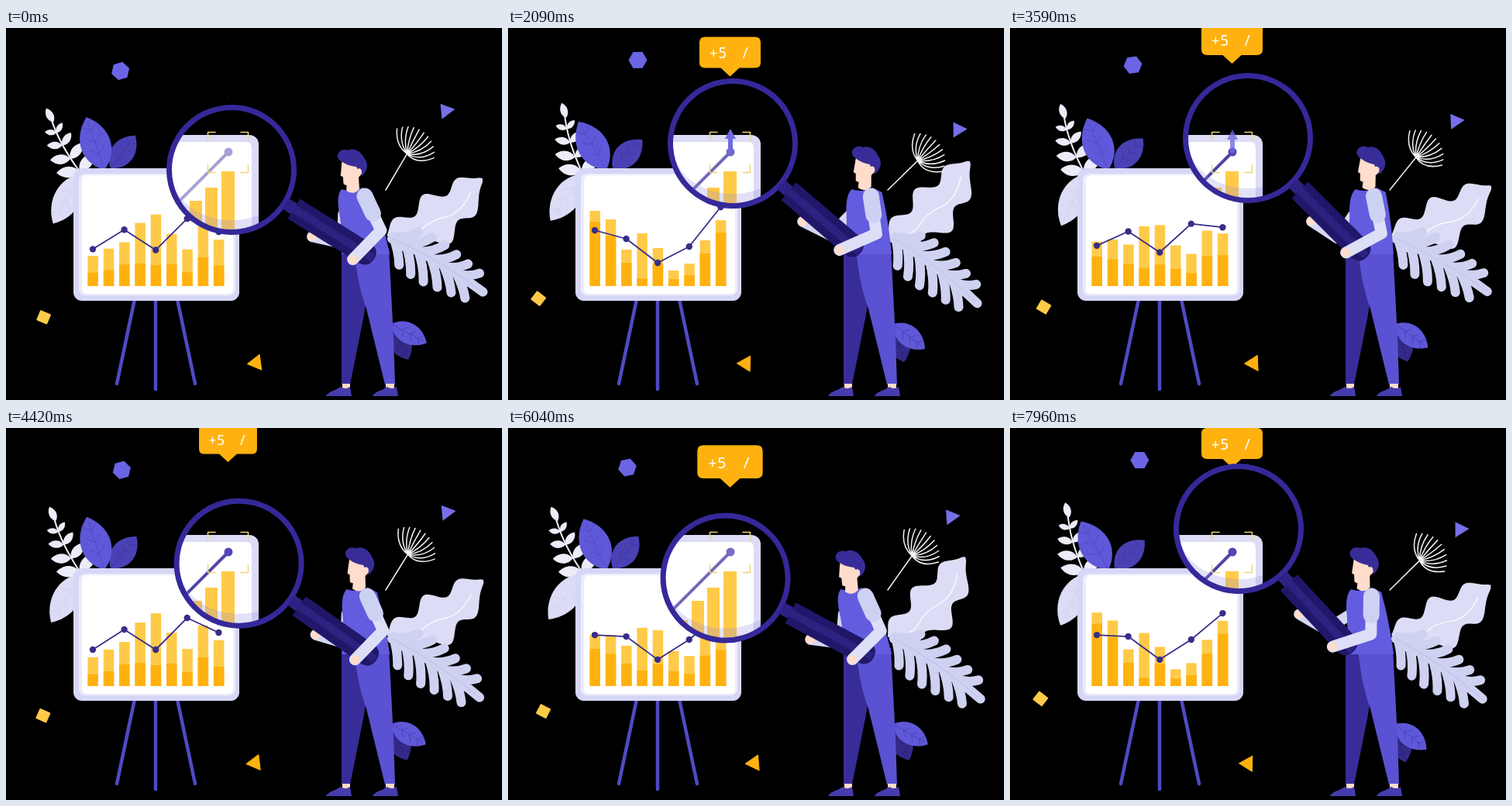
Write an HTML page that moves like this. It is 640 px wide and 480 px high and loops after 8 s.

```html
<!DOCTYPE html>
<html lang="en">
<head>
<meta charset="utf-8">
<title>Chart inspection</title>
<style>
  html, body { margin: 0; width: 100%; height: 100%; overflow: hidden; background: #000; }
  svg { display: block; width: 100vw; height: 100vh; }
  text { font: 500 19px "Noto Sans Mono", "DejaVu Sans Mono", monospace; fill: #fff; }
  .blue { fill: #635cdf; }
  .navy { fill: #382d98; }
  .pale { fill: #dcdcf6; }
  .skin { fill: #ffdccb; }
  .gold { fill: #ffb20f; }
  .sun { fill: #ffca48; }
  .line { fill: none; stroke-linecap: round; stroke-linejoin: round; }
</style>
</head>
<body>
<svg viewBox="0 0 640 480">
  <defs>
    <clipPath id="lensClip"><circle id="lensHole" r="79"/></clipPath>
    <clipPath id="boardClip"><rect x="100" y="138" width="226" height="220" rx="12"/></clipPath>
  </defs>

  <path id="hexagon" fill="#6b64e4" d="M-12 0L-6 -10.500H6L12 0L6 10.500H-6Z"/>
  <path id="topTriangle" fill="#766fe8" d="M-8 -10L10 -1L-8 10Z"/>
  <rect id="square" class="sun" x="-7.500" y="-7" width="15" height="14" rx="1"/>
  <path id="lowTriangle" class="gold" stroke="#ffb20f" stroke-width="1" stroke-linejoin="round" d="M-11 0L6 -10V10Z"/>

  <!-- plants beside the board -->
  <g id="branch"></g>
  <g id="underLeaf"></g>
  <g id="sideLeaf"></g>
  <g id="tallLeaf"></g>

  <!-- easel -->
  <path class="line" stroke="#5049c4" stroke-width="4.500" d="M166 350L143 459M193 350V466M221 350L244 459"/>
  <rect x="87" y="181" width="214" height="171" rx="11" fill="#d6d7f6"/>
  <rect x="94" y="188" width="202" height="157" rx="8" fill="#ececfb"/>
  <rect x="98" y="190" width="195" height="153" rx="6" fill="#fff"/>
  <g id="bars"></g>
  <polyline id="trend" class="line" stroke="#382d88" stroke-width="1.800"/>
  <g id="dots"></g>

  <!-- plants behind the person -->
  <g id="oak"></g>
  <g id="fern"></g>
  <g id="dandelion"></g>
  <g id="lowLeaves"></g>

  <!-- person, lower half -->
  <path class="navy" d="M433 284H476L461 375L444 460H433Z"/>
  <path fill="#5a52d2" d="M449 284H494L500 400L502 460H489L465 362Q453 330 449 284Z"/>
  <path class="skin" d="M434 459H444V467H434ZM490 459H501V467H490Z"/>
  <path id="shoe" fill="#463dae" d="M413 475Q415 470 425 467L432 463Q438 467 444 463L446 475Z"/>
  <use href="#shoe" x="60"/>

  <polyline id="backArm" class="line" stroke="#d4d7f3" stroke-width="14"/>
  <circle id="backHand" class="skin" r="6"/>
  <g id="torso">
    <path class="blue" d="M443 208Q456 213 470 206L482 212Q491 250 495 292H433Q438 262 436 234Q436 214 443 208Z"/>
  </g>
  <g id="head">
    <path class="skin" d="M453 190H468V205Q460 213 451 206Z"/>
    <path class="skin" d="M448 168L445 186L448 188V197Q452 201 461 197L474 184V166Z"/>
    <path class="navy" d="M443 159Q447 150 457 154Q470 150 478 167Q484 178 473 188L469 186Q468 180 466 176Q455 174 449 169Q442 165 443 159Z"/>
    <ellipse class="skin" cx="469" cy="183" rx="3.500" ry="4.500"/>
  </g>

  <!-- enlarged chart, seen only through the glass -->
  <g clip-path="url(#lensClip)">
    <rect x="100" y="138" width="226" height="220" rx="12" fill="#dcdcf6"/>
    <rect x="95" y="147" width="222" height="210" rx="7" fill="#fff"/>
    <path class="sun" d="M217 248h15v60h-15zM237 223h16v80h-16zM257 206h16v90h-16zM278 185h17v110h-17z"/>
    <g id="marker">
      <path stroke="#4d43a6" stroke-width="4" d="M287 160L187 260"/>
      <circle cx="287" cy="160" r="5.500" fill="#4f46b8"/>
    </g>
    <circle id="pulse" cx="287" cy="160" fill="#6a64dc"/>
    <path id="arrow" fill="#6f68e0" d="M287 130L294 143H290V160H284V143H280Z"/>
    <g clip-path="url(#boardClip)">
      <path id="shade" fill="#8f88e0" fill-opacity=".25" d="M-79 0A79 79 0 0 0 79 0A79 65 0 0 1 -79 0Z"/>
    </g>
  </g>

  <g id="bubble">
    <path class="gold" d="M-32 -51H32Q39.500 -51 39.500 -44V-18Q39.500 -11 32 -11H12L0 0L-12 -11H-32Q-39.500 -11 -39.500 -18V-44Q-39.500 -51 -32 -51Z"/>
    <text x="-27" y="-23">+5</text>
    <text x="14" y="-23">/</text>
  </g>

  <g id="glass">
    <circle r="80.500" fill="none" stroke="#35299a" stroke-width="7"/>
    <rect x="82" y="-8" width="20" height="16" fill="#2d2284"/>
    <path fill="#21176a" d="M95 -15H204Q217 -13 217 0Q217 13 204 15H95Z"/>
    <path fill="#2c2280" d="M95 -5H215V5H95Z"/>
  </g>
  <path class="line" stroke="#e9d679" stroke-width="1.500" d="M270 134.500H260.500V144M303 134.500H312.500V144M260.500 177V186.500H270M312.500 177V186.500H303"/>

  <polyline id="frontArm" class="line" stroke="#dcdff6" stroke-width="15"/>
  <line id="sleeve" class="line" stroke="#cdd1f2" stroke-width="21"/>
  <circle id="frontHand" class="skin" r="6"/>
</svg>

<script>
const LOOP = 8;
const $ = id => document.getElementById(id);
const set = (node, attrs) => { for (const k in attrs) node.setAttribute(k, attrs[k]); return node; };
const add = (parent, tag, attrs) =>
  parent.appendChild(set(document.createElementNS("http://www.w3.org/2000/svg", tag), attrs));
const place = (id, x, y, angle = 0, scale = 1) =>
  $(id).setAttribute("transform", `translate(${x} ${y}) rotate(${angle}) scale(${scale})`);
const mix = (a, b, k) => a + (b - a) * k;
const smooth = k => k * k * (3 - 2 * k);
const wave = (t, peak, period) => Math.cos(2 * Math.PI * (t - peak) / period);
const swing = (t, peak, period) => (1 + wave(t, peak, period)) / 2;

// Smooth curve through rows of [time, ...values].
function track(rows) {
  const slope = (i, c) => {
    const a = rows[Math.max(i - 1, 0)], b = rows[Math.min(i + 1, rows.length - 1)];
    return (b[c] - a[c]) / (b[0] - a[0]);
  };
  return t => {
    let i = 0;
    while (i < rows.length - 2 && t > rows[i + 1][0]) i++;
    const a = rows[i], b = rows[i + 1], d = b[0] - a[0];
    const u = Math.min(1, (t - a[0]) / d), v = 1 - u;
    return a.slice(1).map((p, n) => {
      const c = n + 1;
      return p * v * v * (1 + 2 * u) + b[c] * u * u * (3 - 2 * u)
        + d * u * v * (v * slope(i, c) - u * slope(i + 1, c));
    });
  };
}
const linear = rows => t => {
  let i = 0;
  while (i < rows.length - 2 && t > rows[i + 1][0]) i++;
  const [a, p] = rows[i], [b, q] = rows[i + 1];
  return mix(p, q, Math.min(1, (t - a) / (b - a)));
};

// time, lens x, lens y, handle angle, lean of the upper body
const pose = track([
  [0, 291, 183, 32, -17], [1.29, 281, 159, 37.5, 0], [2.09, 290, 149, 40.5, 1],
  [3.59, 307, 142, 45, 5], [5.34, 289, 207, 25, -19], [6.79, 276, 165, 36, -22],
  [7.96, 295, 130, 47, -5]
]);
const bubbleY = track([[0, 90], [.34, 87], [1.29, 73], [1.79, 66], [2.09, 62.5], [2.96, 51], [3.59, 46], [5, 43]]);
const bubbleScale = linear([[0, 0], [.18, 1.45], [.34, 1.2], [.6, 1.1], [1.29, 1.05], [1.7, 1], [4.4, 1], [4.8, 0], [5, 0]]);
const markerAlpha = linear([[0, .5], [1.29, .85], [1.79, .55], [2.09, .8], [2.96, 1], [4.4, 1], [5, .5]]);

// Leaf along +x, starting at the group's origin.
const leafPath = (l, w) =>
  `M0 0C${l * .25} ${-w} ${l * .7} ${-w} ${l} 0C${l * .7} ${w} ${l * .25} ${w} 0 0Z`;
function leaf(parent, length, width, fill, vein, turn = 0) {
  const g = add(parent, "g", { transform: `rotate(${turn})` });
  add(g, "path", { d: leafPath(length, width), fill });
  let d = `M0 0H${length * .9}`;
  for (let x = length * .3; x < length * .8; x += length * .22)
    d += `M${x} 0l${length * .12} ${-width * .4}M${x} 0l${length * .12} ${width * .4}`;
  add(g, "path", { d, fill: "none", stroke: vein, "stroke-width": .8 });
}

leaf($("tallLeaf"), 72, 26, "#5f58d8", "#5049c0");
leaf($("sideLeaf"), 53, 20, "#4a41b4", "#4037a4");
leaf($("underLeaf"), 74, 23, "#dcdcf6", "#cfd0f0");
leaf($("lowLeaves"), 51, 20, "#342a88", "#2c237c", 36);
leaf($("lowLeaves"), 52, 18, "#5f58d8", "#4840b4");

// Twig with paired leaflets that grow towards the foot.
add($("branch"), "path", { class: "line", stroke: "#f0f0fa", "stroke-width": 2, d: "M0 0Q46 -7 80 0" });
[[72, 0, 20, 0], [58, -3, 15, 58], [40, -4, 20, 62], [20, -3, 26, 66], [0, 0, 30, 66]].forEach(([x, y, l, spread]) => {
  for (const side of spread ? [-1, 1] : [1])
    add($("branch"), "path", {
      fill: "#ececf9", d: leafPath(l, l * .32),
      transform: `translate(${x} ${y}) rotate(${side * spread})`
    });
});

// Leaf with deep rounded lobes, fuller on its lower side
const edge = [];
for (let i = 0; i <= 120; i++) {
  const u = i < 61 ? i / 60 : (120 - i) / 60, side = i < 61 ? -1 : 1;
  const body = Math.sin(Math.PI * Math.min(1, u * .92 + .08)) ** .6;
  const w = 34 * body * (.8 + .26 * Math.sin(u * 18 - .25 + side * .4));
  edge.push(`${(u * 143).toFixed(1)} ${(side * w + 10 * Math.sin(Math.PI * u)).toFixed(1)}`);
}
add($("oak"), "path", { class: "pale", d: `M${edge.join("L")}Z` });
add($("oak"), "path", { class: "line", stroke: "#fff", "stroke-width": 1.2, d: "M5 0q20 14 35 10t35 4t45 -8" });

// Broad fern
let fronds = "M0 0Q60 -8 136 0";
for (let i = 0; i < 6; i++) {
  const x = i * 19, reach = 29 - Math.abs(i - 1.5) * 3;
  for (const side of [-1, 1]) fronds += `M${x} -3Q${x + 16} ${side * reach * .4} ${x + 25} ${side * reach}`;
}
add($("fern"), "path", { class: "line", stroke: "#cfd1f1", "stroke-width": 12, d: fronds });
add($("fern"), "path", { class: "line", stroke: "#bfc2e9", "stroke-width": 1, d: "M0 0Q60 -8 132 0" });

// Seed head: a cup of rays that bend upwards
let rays = "M0 0V-54";
for (let i = 0; i < 11; i++) {
  const end = (-52 + i * 12) * Math.PI / 180, bend = end * 1.6;
  rays += `M0 -54Q${19 * Math.sin(bend)} ${-54 - 19 * Math.cos(bend)} ${35 * Math.sin(end)} ${-54 - 35 * Math.cos(end)}`;
}
add($("dandelion"), "path", { class: "line", stroke: "#f4f4f2", "stroke-width": 1.5, d: rays });

// Chart: bar top and dark part, each as low state / high state
const bars = [
  [296, 236, 318, 250], [286, 247, 314, 268], [276, 286, 305, 303], [251, 265, 303, 323], [239, 284, 306, 304],
  [264, 313, 304, 324], [285, 304, 315, 319], [255, 274, 296, 291], [274, 248, 308, 264]
].map(([top, top2, dark, dark2], i) => {
  const box = cls => add($("bars"), "rect", { class: cls, x: 105.5 + i * 20.3, width: 13.5 });
  return { top, top2, dark, dark2, light: box("sun"), deep: box("gold") };
});
const points = [[286, 261], [260, 272], [286, 303], [245, 282], [264, 231]].map(([low, high], i) => ({
  low, high, x: 112 + i * 40.6, dot: add($("dots"), "circle", { r: 4.2, fill: "#382d88" })
}));

// Two-bone arm
function arm(id, a, b, upper, lower) {
  const dx = b[0] - a[0], dy = b[1] - a[1], dist = Math.hypot(dx, dy);
  const along = (dist * dist + upper * upper - lower * lower) / (2 * dist);
  const out = Math.sqrt(Math.max(0, upper * upper - along * along));
  const elbow = [a[0] + (dx * along + dy * out) / dist, a[1] + (dy * along - dx * out) / dist];
  set($(id), { points: [a, elbow, b].join(" ") });
  return elbow;
}

function draw(t) {
  const drift = swing(t, 2.35, 5.3), sway = swing(t, 2.6, 5.3);
  const grow = smooth(swing(t, 2.08, 5.3)), line = smooth(swing(t, 2, 5));
  const beat = t % 5;

  place("hexagon", mix(147, 168, drift), mix(56, 41, drift), mix(-18, 0, drift));
  place("topTriangle", mix(569, 583, drift), mix(106, 132, drift), mix(-6, 0, drift));
  place("square", mix(49, 39, drift), mix(374, 348.5, drift), mix(22, 38, drift));
  place("lowTriangle", mix(323, 306, drift), mix(432, 433, drift), mix(-8, 2, drift));

  place("branch", 95, 185, mix(-118, -105, sway));
  place("tallLeaf", 127, 183, mix(-108.5, -120, grow));
  place("sideLeaf", 135, 181, mix(-53, -43, sway));
  place("underLeaf", 97, 188, 122 + 7.5 * wave(t, 1.3, 4.2));
  place("oak", 497, 275, -39.5 - 10 * wave(t, 1.5, 4.5));
  place("fern", 498, 272, 34 + 4 * wave(t, 1.9, 3.4));
  place("dandelion", 490, 209, mix(30, 46, drift));
  place("lowLeaves", 497, 382, mix(28, 39, sway));

  for (const b of bars) {
    const top = mix(b.top, b.top2, grow), dark = mix(b.dark, b.dark2, grow);
    set(b.light, { y: top, height: 333 - top });
    set(b.deep, { y: dark, height: 333 - dark });
  }
  const trend = points.map(p => {
    const y = mix(p.low, p.high, line);
    set(p.dot, { cx: p.x, cy: y });
    return [p.x, y];
  });
  set($("trend"), { points: trend.join(" ") });

  const [x, y, angle, lean] = pose(t);
  place("glass", x, y, angle);
  place("shade", x, y);
  set($("lensHole"), { cx: x, cy: y });
  const arrow = Math.max(0, wave(t, 2.1, 5 / 3));
  set($("arrow"), { opacity: arrow, transform: `translate(0 ${5 * (1 - arrow)})` });
  set($("marker"), { opacity: markerAlpha(beat) });
  const burst = Math.min(1, Math.max(0, (beat - .08) / .6));
  set($("pulse"), { r: 6 + 28 * burst, opacity: burst > 0 ? 1 - burst : 0 });
  place("bubble", 286.5, bubbleY(beat)[0], 0, bubbleScale(beat));

  const k = -lean * .6 / 84;
  set($("torso"), { transform: `matrix(1 0 ${k} 1 ${-290 * k} 0)` });
  set($("head"), {
    transform: `translate(${lean * .7} ${Math.max(0, -lean * .2)}) rotate(${lean * .25} 460 205)`
  });

  const rad = angle * Math.PI / 180, cos = Math.cos(rad), sin = Math.sin(rad);
  const grip = (u, v) => [x + u * cos - v * sin, y + u * sin + v * cos];
  const backHand = grip(134, 18), frontHand = grip(194, 15);
  arm("backArm", [442 + lean * .4, 240], backHand, 38, 40);
  set($("backHand"), { cx: backHand[0], cy: backHand[1] });
  const shoulder = [468 + lean * .3, 217];
  const elbow = arm("frontArm", shoulder, frontHand, 49, 52);
  set($("sleeve"), {
    x1: shoulder[0], y1: shoulder[1],
    x2: mix(shoulder[0], elbow[0], .5), y2: mix(shoulder[1], elbow[1], .5)
  });
  set($("frontHand"), { cx: frontHand[0], cy: frontHand[1] });
}

function frame() {
  draw(performance.now() / 1000 % LOOP);
  requestAnimationFrame(frame);
}
frame();
</script>
</body>
</html>
```
